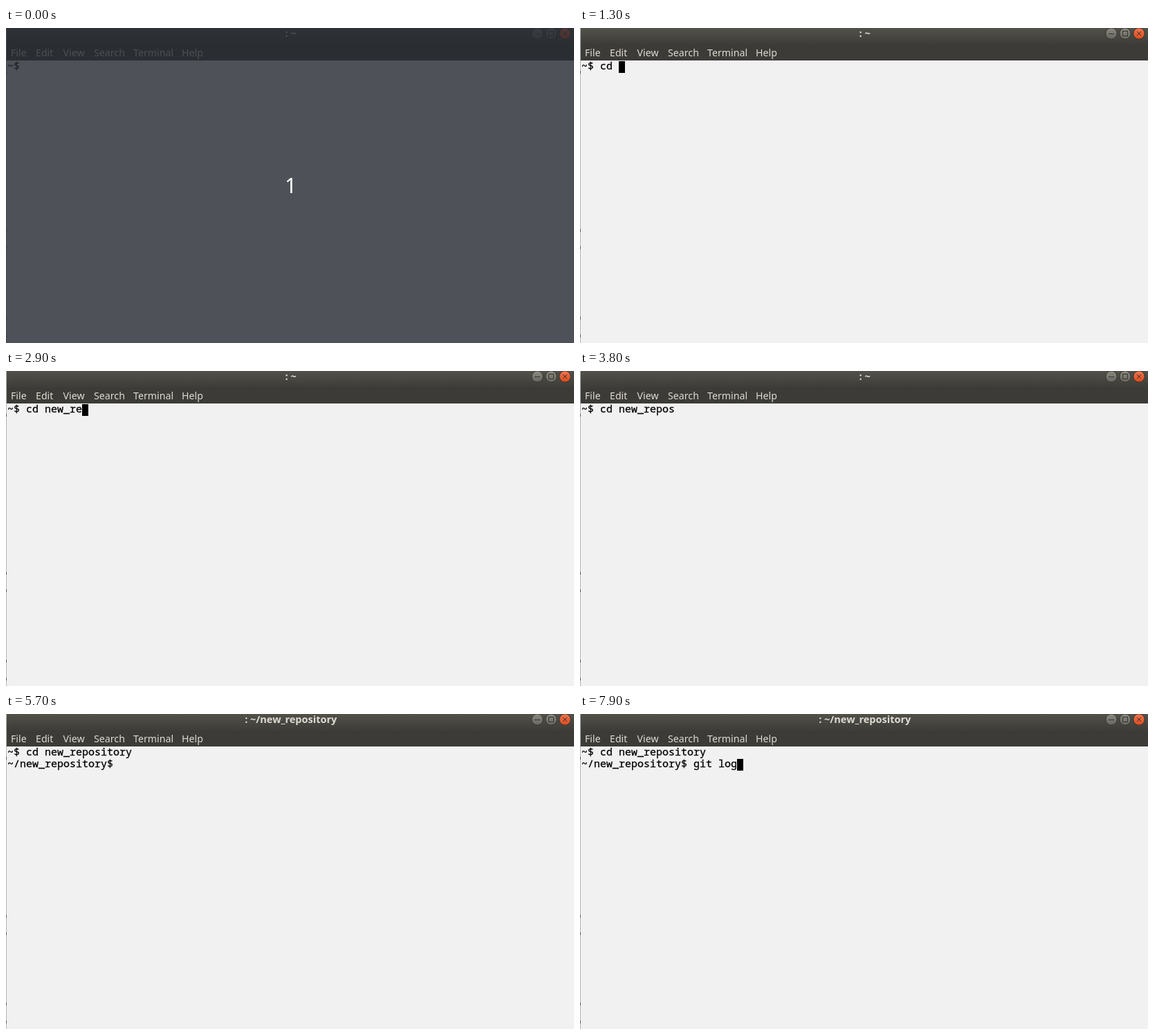
Recreate the animation shown at these times as an HTML page with a canvas. Size 821 px wide and 456 px high, loop 8000 ms.

```html
<!DOCTYPE html>
<html lang="en">
<head>
<meta charset="utf-8">
<title>Terminal</title>
<style>
  html, body { margin: 0; width: 100%; height: 100%; overflow: hidden; background: #f1f1f1; }
  canvas { display: block; }
</style>
</head>
<body>
<canvas id="stage" width="821" height="456"></canvas>
<script>
const W = 821, H = 456, LOOP = 8000;
const SAMPLE = 100;    // the screen refreshes this often
const KEY_GAP = 60;    // between keys of one burst
const CELL = 9, ROW = 17, LEFT = 2, TOP = 48, BAR = 47;
const SANS = '"Noto Sans", "Open Sans", sans-serif';
const MONO = '15px "Noto Sans Mono", "DejaVu Sans Mono", monospace';
const ctx = document.getElementById('stage').getContext('2d');

// Keys come in short bursts, each named by the time it begins.
const LINES = [
  { from: 0, prompt: '~$ ', bursts: {
    850: 'cd', 1300: ' ', 1410: 'ne', 2000: 'w', 2250: '_r', 2850: 'ep',
    3200: 'o', 3500: 's', 4240: 'ito', 4600: 'r', 5000: 'y' } },
  { from: 5500, prompt: '~/new_repository$ ', bursts: {
    6400: 'g', 6540: 'it ', 7500: 'l', 7750: 'og' } }
];
const COUNTDOWN_END = 300, TITLE_AT = 5100;

function typed(bursts, t) {
  return Object.entries(bursts).map(([at, keys]) => {
    const count = Math.floor((t - at) / KEY_GAP) + 1;
    return keys.slice(0, Math.max(0, count));
  }).join('');
}

function cursorVisible(t) {
  const within = (from, length) => t >= from && t < from + length;
  return t >= COUNTDOWN_END && !within(3800, 200) && !within(5700, 600) && !within(7300, 100);
}

function label(text, x, y, font, color, align = 'left') {
  ctx.font = font;
  ctx.fillStyle = color;
  ctx.textAlign = align;
  ctx.fillText(text, x, y);
}

function box(x, y, w, h, color) {
  ctx.fillStyle = color;
  ctx.fillRect(x, y, w, h);
}

function shade(height, top, bottom) {
  const fill = ctx.createLinearGradient(0, 0, 0, height);
  fill.addColorStop(0, top);
  fill.addColorStop(1, bottom);
  return fill;
}

function line(x1, y1, x2, y2) {
  ctx.beginPath();
  ctx.moveTo(x1, y1);
  ctx.lineTo(x2, y2);
  ctx.stroke();
}

function button(x, top, bottom) {
  ctx.beginPath();
  ctx.arc(x, 8, 8.2, 0, Math.PI * 2);
  ctx.fillStyle = shade(16, top, bottom);
  ctx.fill();
  ctx.strokeStyle = '#35332e';
  ctx.lineWidth = 1;
  ctx.stroke();
}

function drawButtons() {
  button(768, '#8b8a81', '#67665f');
  line(764, 8.5, 772, 8.5);
  button(788, '#8b8a81', '#67665f');
  ctx.strokeRect(784.5, 4.5, 7, 7);
  button(808, '#f17550', '#dc4b1b');
  line(805, 5, 811, 11);
  line(811, 5, 805, 11);
}

function drawHeader(t) {
  box(0, 0, W, BAR, shade(25, '#52524a', '#3c3b37'));
  const title = t >= TITLE_AT ? ': ~/new_repository' : ': ~';
  label(title, 411.7, 13, `bold 14.5px ${SANS}`, '#dfdbd2', 'center');

  const menu = { File: 7, Edit: 43, View: 82.5, Search: 127, Terminal: 184, Help: 254 };
  for (const [name, x] of Object.entries(menu)) {
    label(name, x, 41, `14.2px ${SANS}`, '#dfdbd2');
  }
  drawButtons();
}

function drawEdge() {
  box(0, 0, 1, H, '#b4b4b4');
  for (const y of [64, 293, 318, 420, 446]) box(0, y - 2, 1, 4, '#555');
}

function drawRow(text, row) {
  const y = TOP + row * ROW + 12;
  ctx.strokeStyle = '#000';
  ctx.lineWidth = 0.3;
  [...text].forEach((ch, i) => {
    const x = LEFT + i * CELL;
    label(ch, x, y, MONO, '#000');
    ctx.strokeText(ch, x, y);
  });
}

function drawTerminal(t) {
  const rows = LINES.filter(({ from }) => t >= from)
    .map(({ prompt, bursts }) => prompt + typed(bursts, t));
  rows.forEach(drawRow);
  if (cursorVisible(t)) {
    const last = rows.length - 1;
    box(LEFT + rows[last].length * CELL, TOP + last * ROW, CELL, ROW, '#000');
  }
}

function drawCountdown() {
  box(0, 0, W, H, 'rgba(38, 43, 51, 0.8)');
  label('1', 403, 239, `30px ${SANS}`, '#fff');
}

function draw(t) {
  box(0, 0, W, H, '#f1f1f1');
  drawHeader(t);
  drawEdge();
  drawTerminal(t);
  if (t < COUNTDOWN_END) drawCountdown();
}

const start = performance.now();
function tick() {
  const t = (performance.now() - start) % LOOP;
  draw(Math.floor(t / SAMPLE) * SAMPLE);
  requestAnimationFrame(tick);
}
tick();
</script>
</body>
</html>
```
